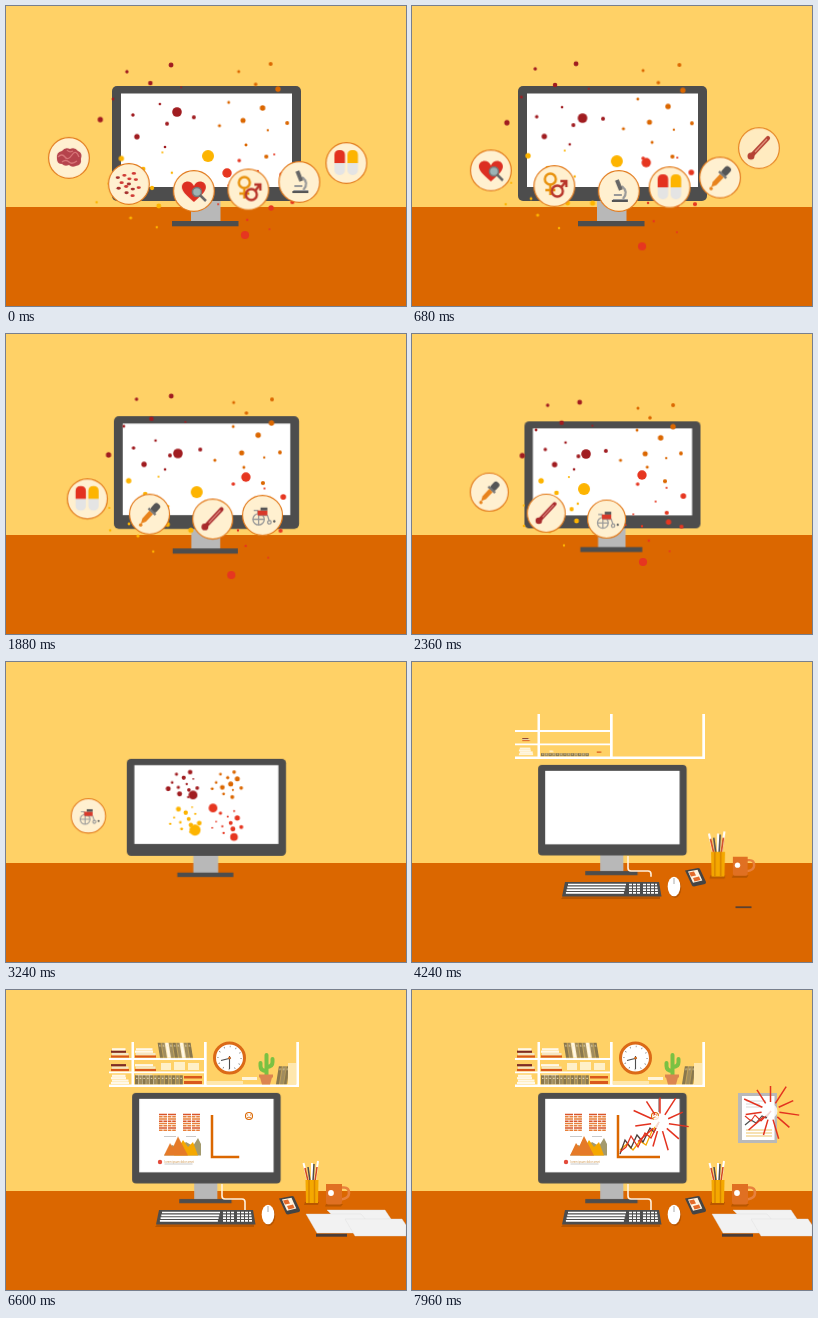
An HTML page for the animation above (8000 ms loop, 400 by 300 pixels).

```html
<!DOCTYPE html>
<html lang="en">
<head>
<meta charset="utf-8">
<title>Health desk</title>
<style>
html, body { margin: 0; width: 100%; height: 100%; overflow: hidden; background: #ffd166; }
svg { display: block; width: 100vw; height: 100vh; }
g, path, circle, rect { transform-origin: 0 0; }

.zoom { animation: zoom 8s linear infinite; transform-origin: 200px 187px; }
@keyframes zoom { 0%, 21% { transform: scale(1); } 47.5%, 100% { transform: scale(.786); } }

.dot { animation: drift 8s linear infinite; }
@keyframes drift {
  0% { transform: translate(var(--p0)); }
  18% { transform: translate(var(--p1)); }
  29.5% { transform: translate(var(--p2)); }
  40.5%, 44% { transform: translate(var(--p3)) scale(.93); }
  49%, 100% { transform: translate(var(--p3)) scale(0); }
}

/* Badges follow one arc, 400 ms apart */
.badge { animation: arc 8s linear calc((var(--k) - 25.6) * 400ms) infinite; }
@keyframes arc {
  0% { transform: translate(348px, 136px) scale(.3); opacity: 0; }
  1.5% { transform: translate(347px, 142px); opacity: .85; }
  3% { transform: translate(340.5px, 157px); opacity: 1; }
  5.5% { transform: translate(318px, 168.5px); }
  8% { transform: translate(293.5px, 176px); }
  13% { transform: translate(242.5px, 183.5px); }
  16.5% { transform: translate(207px, 185px); }
  18% { transform: translate(188px, 185px); }
  23% { transform: translate(123px, 178px); }
  26.5% { transform: translate(79px, 164.5px); }
  28% { transform: translate(63px, 152px); }
  28.6% { transform: translate(60px, 147px); opacity: 1; }
  30%, 100% { transform: translate(58px, 139px) scale(.3); opacity: 0; }
}

/* Gates keep wrapped animations out of sight */
.first { animation: first 8s step-end infinite; }
@keyframes first { 0% { visibility: visible; } 43.8%, 100% { visibility: hidden; } }
.desk { animation: desk 8s step-end infinite; }
@keyframes desk { 0% { visibility: hidden; } 43%, 100% { visibility: visible; } }
.late { animation: late 8s step-end infinite; }
@keyframes late { 0% { visibility: hidden; } 72.5%, 100% { visibility: visible; } }

.pop, .grow, .draw { animation: pop 8s calc(var(--d) * 1ms - 8s) infinite; transform-box: fill-box; transform-origin: center; }
.grow { transform-origin: bottom; animation-name: grow; }
.draw { stroke-dasharray: 1 2; animation-name: draw; }
@keyframes pop {
  0% { transform: scale(0); animation-timing-function: ease-out; }
  3.5% { transform: scale(1.08); }
  5%, 55% { transform: scale(1); }
  55.01%, 100% { transform: scale(0); }
}
@keyframes grow {
  0% { transform: scaleY(0); animation-timing-function: ease-out; }
  5%, 55% { transform: scaleY(1); }
  55.01%, 100% { transform: scaleY(0); }
}
@keyframes draw { 0% { stroke-dashoffset: 1; } 6%, 55% { stroke-dashoffset: 0; } 55.01%, 100% { stroke-dashoffset: 1; } }

.settle { animation: settle 8s ease-in-out infinite; }
@keyframes settle { 0%, 68% { transform: translate(var(--from)); } 73.5%, 100% { transform: translate(0, 0); } }

.fall { animation: fall 8s linear infinite; transform-origin: 378px 194px; }
@keyframes fall {
  0%, 61% { transform: translate(24px, -140px) rotate(25deg); opacity: 0; }
  61.1% { transform: translate(24px, -140px) rotate(25deg); opacity: 1; }
  66.5% { transform: translate(0, 0) rotate(0); opacity: 1; }
  69% { transform: translate(-24px, 36px) rotate(-40deg) scaleY(.45); opacity: 1; }
  70%, 100% { transform: translate(-26px, 38px) rotate(-50deg) scaleY(.3); opacity: 0; }
}
</style>
</head>
<body>
<svg viewBox="0 0 400 300" preserveAspectRatio="none">
  <rect width="400" height="300" fill="#ffd166"/>
  <rect y="201" width="400" height="99" fill="#db6700"/>

  <g class="desk">
    <g fill="#fff">
      <rect class="pop" style="--d:3650" x="103" y="94.5" width="190" height="2.5"/>
      <path class="grow" style="--d:3800" d="M125.5 52h2.5v43h-2.5zM198 52h2.7v43H198zM290.3 52h2.7v43h-2.7z"/>
      <path class="pop" style="--d:3800" d="M103 68h96v2h-96zM103 81.5h96v1.8h-96z"/>
    </g>
    <g id="books"></g>
    <path class="grow" style="--d:4250" fill="#ffe7ad" d="M201 91h36v3.5h-36zM282 73h8v21h-8z"/>
    <rect class="pop" style="--d:4400" x="236" y="87" width="15" height="3" fill="#fff5dc"/>
    <g class="settle" style="--from:1.5px,1px"><g class="pop" style="--d:4300">
      <circle cx="223.5" cy="68" r="15" fill="#fff" stroke="#db6a17" stroke-width="3"/>
      <circle cx="223.5" cy="68" r="11.5" fill="none" stroke="#777" stroke-width="1.6" stroke-dasharray=".7 5.32"/>
      <path d="M215 70.5 225 68M223.5 66v13" stroke="#4d4d4d" stroke-width="1.1"/>
      <circle cx="223.5" cy="68" r="1.3" fill="#db6a17"/>
    </g></g>
    <g class="grow" style="--d:4450">
      <path d="M260.5 86V65M260.5 81q-6 0-6-5v-3M260.5 77q6 0 6-5v-3" fill="none" stroke="#7ac143" stroke-linecap="round" stroke-width="4"/>
      <path d="M253 84.5h14v3h-1l-2 7h-8l-2-7h-1z" fill="#dc8550"/>
    </g>
  </g>

  <g class="zoom">
    <rect x="185" y="194" width="29.5" height="22" fill="#b8b8b8"/>
    <rect x="166" y="215" width="66.5" height="5.3" fill="#4d4d4d"/>
    <rect x="106" y="80" width="189" height="115" rx="5" fill="#4d4d4d"/>
    <rect x="115" y="87.5" width="171" height="93.5" fill="#fff"/>
  </g>

  <g id="dots"></g>

  <g class="desk">
    <path class="draw" style="--d:3950" pathLength="1" d="M216 194v12q0 3 3 3h17q3 0 3 3v8" fill="none" stroke="#fff0dc" stroke-width="1.6"/>
    <g class="pop" style="--d:3600">
      <path d="M151 234.5h97v2.5h-99z" fill="#b85600"/>
      <path d="M153 220h94l2.5 14.5H150z" fill="#4d4d4d"/>
      <g id="keys" stroke="#fff" stroke-width="1.7"></g>
    </g>
    <g class="pop" style="--d:3750" transform="rotate(-18 262 224.5)">
      <ellipse cx="263" cy="226" rx="6.3" ry="10" fill="#b85600"/>
      <ellipse cx="262" cy="224.5" rx="6.3" ry="9.8" fill="#fff"/>
      <path d="M262 216v6" stroke="#aaa"/>
    </g>
    <g class="pop" style="--d:3850">
      <path d="M273 208.5 286 206q1.5 0 2 1l6 13q0 1.5-1 2l-11 2.500q-1.500 0-2-1z" fill="#444"/>
      <path d="m276 209.500 9.500-1.800 4.800 10.800-9.300 2.200z" fill="#fff4e0"/>
      <path d="m277 210.500 5-1 2 4-5 1zM281 216l6-1.500 1.500 3.500-6 1.500z" fill="#e36a2a"/>
    </g>
    <g class="pop" style="--d:3950">
      <path d="M299 212h14l-1 3h-14z" fill="#b85600"/>
      <path d="M302 191 297.5 173M306 191V173M309 191l3-20" stroke="#fff" stroke-width="2"/>
      <path d="M304 191l-2-14M307 191l1-17" stroke="#4d4d4d" stroke-width="1.5"/>
      <path d="M309 191l2-14M299 178l3 13" stroke="#d24a20" stroke-width="1.6"/>
      <path d="M299.5 190h13l-.5 23h-12z" fill="#f5a800"/>
      <path d="M303 190v23M308.5 190v23" stroke="#d98500" stroke-width="1.5"/>
    </g>
    <g class="pop" style="--d:4050">
      <path d="M320 214h17l-2 2.5h-16z" fill="#b85600"/>
      <path d="M335 197.5h3q5 0 5 5.5t-8 6.5" fill="none" stroke="#e8813c" stroke-width="2.6"/>
      <path d="M320 194h16v18q0 2.500-2 2.500h-12q-2 0-2-2.500z" fill="#e07022"/>
      <circle cx="325" cy="203" r="2.9" fill="#fff"/>
    </g>
    <g class="settle" style="--from:6px,0px"><rect class="pop" style="--d:4150" x="310" y="243.7" width="31" height="3" fill="#4a3d38"/></g>
    <g fill="#f2f2f2" stroke="#dcdcdc" stroke-width=".4">
      <path class="pop" style="--d:5500" d="M321 220h58l6 9-52 3z"/>
      <path class="pop" style="--d:5560" d="M300 224h55l16 19h-60z"/>
      <path class="pop" style="--d:4750" d="M339 229h57l4 6v11h-51z"/>
      <path class="fall" fill-opacity=".85" stroke="none" d="M372 161 388 172Q382 200 383 227 374 222 367 212 371 195 372 161z"/>
    </g>

    <g class="pop" style="--d:4500">
      <circle cx="243" cy="126" r="3.5" fill="none" stroke="#db6700" stroke-width="1.1"/>
      <path d="M241 125h1.2M244 125h1.2M241 128q2-2 4 0" fill="none" stroke="#db6700" stroke-width=".9"/>
    </g>
    <g class="settle" style="--from:0px,5px"><g class="pop" style="--d:4700">
      <circle cx="154" cy="172" r="2.2" fill="#e34a3a"/>
      <text x="158.5" y="172.500" font-family="Open Sans, sans-serif" font-size="2.600" fill="#c98a3a">lorem ipsum dolor amet</text>
    </g></g>
  </g>

  <g class="late">
    <g id="tables" stroke-width="1.700"></g>
    <path class="pop" style="--d:6100" d="M158 146.500h12M180 146.500h10M158.500 174h28" stroke="#bbb" stroke-width=".8"/>
    <path class="grow" style="--d:6150" fill="#a39a6d" d="M158 165.500 166 155 173 158 180 152 187 156 192 148 195 154v11.500z"/>
    <path class="grow" style="--d:6200" fill="#f5a800" d="M168 165.500 177 150 182 157 187 152 192 165.500z"/>
    <path class="grow" style="--d:6250" fill="#e57a28" d="M158 165.500 164 153 167 157 172 146 182 165.500z"/>
    <path class="draw" style="--d:6350" pathLength="1" d="M206 125v42h42" fill="none" stroke="#db6700" stroke-width="2.500"/>
    <g fill="none" stroke-width="1.300">
      <path class="draw" style="--d:6700" pathLength="1" d="M208 160l7-6 6 6 7-9 6 4 6-14 7-9" stroke="#f5a800"/>
      <path class="draw" style="--d:6800" pathLength="1" d="M208 164l5-14 6 8 6-13 6 7 7-14 4 4 5-10" stroke="#4d3d38"/>
      <path class="draw" style="--d:6900" pathLength="1" d="M208 162l6-5 5-11 7 11 7-14 6 5 8-16" stroke="#e3321f"/>
    </g>
    <path class="draw" style="--d:7200" pathLength="1" d="M247 122V109" stroke="#6a4540"/>

    <g class="pop" style="--d:6800">
      <path d="M326 103h39v50h-39z" fill="#b9b9b9"/>
      <path d="M330 106h32.500v44H330z" fill="#fff"/>
      <path d="M334 111h20M334 114h14M334 117h17" stroke="#ccc" stroke-width=".8"/>
      <path d="M334 140h26M334 143h26M334 146h26" stroke="#f4d79a" stroke-width="1.500"/>
      <g fill="none" stroke-width="1.100">
        <path d="M333 135l6-5 5 3 6-7 4 2 5-7" stroke="#4d4d4d"/>
        <path d="M333 126l6 5 4-6 6 6 10-10" stroke="#e3321f"/>
      </g>
    </g>
    <g id="bursts"></g>
  </g>

  <g class="first"><g class="zoom" id="badges"></g></g>
</svg>
<script>
const svg = document.querySelector('svg');
const add = (parent, markup) => svg.querySelector(parent).insertAdjacentHTML('beforeend', markup);
const mix = (a, b, f) => a.map((v, i) => v + (b[i] - v) * f);
let seed = 7;
const random = () => (seed = seed * 16807 % 2147483647) / 2147483647;

function dot(color, r, stops) {
  const vars = stops.map(([x, y], i) => `--p${i}:${x}px,${y}px`).join(';');
  add('#dots', `<circle class="dot" r="${r}" fill="${color}" style="${vars}"/>`);
}

// A wide cloud that wanders, then gathers into a small one on the screen
function swarm(color, wide, spread, home) {
  const count = 12;
  for (let i = 0; i < count; i++) {
    const a = i * 2.4, d = Math.sqrt((i + .5) / count);
    const at = ([x, y], [rx, ry]) => [x + rx * d * Math.cos(a), y + ry * d * Math.sin(a)];
    const start = at(wide, spread), end = at(home, [18, 14]);
    const wander = [start[0] + 16 * random() - 8, start[1] + 16 * random() - 8];
    dot(color, 1 + 1.9 * random() ** 1.5, [start, wander, mix(wander, end, .22), end]);
  }
}
const [crimson, orange, yellow, red] = ['#a01c20', '#db6700', '#fdb400', '#e63620'];
swarm(crimson, [142, 98], [58, 46], [177, 122]);
swarm(orange, [248, 102], [42, 52], [221, 122]);
swarm(yellow, [135, 182], [54, 42], [179, 157]);
swarm(red, [250, 184], [46, 42], [221, 161]);
dot(crimson, 4.8, [[171, 106], [170, 119], [174, 120], [187, 133]]);
dot(yellow, 6, [[202, 150], [208, 161], [172, 155], [189, 168]]);
dot(red, 4.7, [[221, 167], [249, 145], [230, 141], [207, 146]]);
dot(red, 4.1, [[239, 229], [220, 253], [231, 228], [228, 175]]);

const icons = [
  // tissue
  `<path d="M-12 1q-1-7 5-8 3-4 8-2 5-2 8 2 5 2 3 8 1 6-5 7-4 2-7-1-4 2-7-1-5 0-5-5z" fill="#b5434c"/>
   <path d="M-11-1q4-4 7 0t7-2 7 2M-7 4q4-3 7 0t8-1M-2-8q2 3 6 1" fill="none" stroke="#d9777a" stroke-width="1.3"/>`,
  // cells
  [...Array(13)].map((_, i) => {
    const a = i * 2.4, d = 3.7 * Math.sqrt(i);
    return `<ellipse cx="${d * Math.cos(a)}" cy="${d * Math.sin(a)}" rx="2.1" ry="1.4" fill="${i % 3 ? '#cf3a35' : '#a5302f'}"/>`;
  }).join(''),
  // heart
  `<path d="M0 11C-8 4-12 0-12-4c0-6 9-8 12-1 3-7 12-5 12 1 0 4-4 8-12 15z" fill="#dc2f22"/>
   <circle cx="3" cy="1" r="4.500" fill="#9db3b5" stroke="#777" stroke-width="1.500"/><path d="m6 4 6 6" stroke="#666" stroke-width="2.500"/>`,
  // genders
  `<g fill="none" stroke-width="2.400"><g stroke="#e8910c"><circle cx="-4" cy="-7" r="5.500"/><path d="M-4-1V9M-9 4H1"/></g>
   <g stroke="#b8352a"><circle cx="3" cy="5" r="5.500"/><path d="m7 1 4-5M6-5h6v6"/></g></g>`,
  // microscope
  `<g fill="none" stroke="#999" stroke-width="2.200"><path d="M3-5q7 6 1 13M-6 9H9M-5 4h8"/><path d="m-2-11 4 10" stroke="#666" stroke-width="4"/></g>
   <path d="M-7 9H9v2H-7z" fill="#555"/>`,
  // capsules
  [['#e3321f', -12], ['#fdb400', 1]].map(([c, x]) =>
    `<rect x="${x}" y="-13" width="10.500" height="25" rx="5" fill="#e4e4e4"/><path d="M${x} 0v-8q0-5 5.250-5t5.250 5v8z" fill="${c}"/>`).join(''),
  // dropper
  `<g transform="rotate(43)"><rect x="-3.500" y="-14" width="7" height="10" rx="3" fill="#555"/><path d="M-5-5H5v2.500H-5z" fill="#777"/>
   <path d="M-2.500-2.500h5V8L0 13-2.500 8z" fill="#e8831c"/></g><circle cx="-9" cy="11" r="1.800" fill="#e8831c"/>`,
  // thermometer
  `<path d="M9-10-7 7" stroke="#a82a2c" stroke-width="4.200" stroke-linecap="round"/><path d="M8-9-4 4" stroke="#dd8a80" stroke-width="1.200"/>
   <circle cx="-8" cy="8" r="3.500" fill="#a82a2c"/>`,
  // wheelchair
  `<g fill="none" stroke="#999" stroke-width="1.300"><circle cx="-4" cy="4" r="5.800"/><circle cx="7" cy="7" r="1.800"/><path d="M-9-5h4l1 5H5l2 6M-4-2v12M-10 4H2"/></g>
   <path d="M-5-5H5v5H-5z" fill="#d9392a"/><path d="M-2-8h7v3h-7z" fill="#555"/><circle cx="12" cy="6" r="1.200" fill="#555"/>`
];
icons.forEach((icon, k) => add('#badges', `<g class="badge" style="--k:${k}">
  <circle r="20.400" fill="#fff0d0" stroke="#e27a1c" stroke-width="1.200"/>${icon}</g>`));

const inks = ['#7d2b25', '#f4e6c4', '#d9581c', '#8f7d55'];
const paper = '#fff8e8';

// Lying books: one pile per shelf in each of two bays
[[105, 18], [129, 21]].forEach(([x, width], bay) => [67.8, 81.3, 94.3].forEach((y, shelf) => {
  let pile = '';
  for (let j = 0; j < 4 - shelf % 2; j++) {
    const fill = j > 1 + (1 - bay) || shelf === 2 ? paper : inks[(j * 3 + 2) % 4];
    pile += `<rect x="${x + j % 2}" y="${y - 2.4 * (j + 1)}" width="${width - j * 1.5}" height="2.200" fill="${fill}"/>`;
  }
  add('#books', `<g class="pop" style="--d:${4250 - shelf * 80 + bay * 120}">${pile}</g>`);
}));

function uprights(x, y, count, height, slant, delay) {
  let row = '';
  for (let j = 0; j < count; j++) {
    const left = j * 3.7;
    row += `<rect x="${left}" y="${-height}" width="3.400" height="${height}" fill="${j % 4 === 2 && slant > 0 ? paper : j % 2 ? '#a08c5e' : '#89774d'}"/>
      <path d="M${left + 1} ${3 - height}h1.500" stroke="#f4e6c4"/>`;
  }
  add('#books', `<g class="grow" style="--d:${delay}"><g transform="translate(${x} ${y}) skewX(${slant})">${row}</g></g>`);
}
uprights(154, 67.800, 9, 15, 9, 4300);
uprights(129, 94.300, 13, 9, 0, 4150);
uprights(270, 94.300, 3, 18, -9, 4400);
add('#books', '<path class="pop" style="--d:4350" d="M155 73h10v7h-10zM168 72h11v8h-11zM182 73h11v7h-11z" fill="#fff0c8"/>');
add('#books', '<path class="pop" style="--d:4200" d="M178 86h18v2.500h-18zM178 91h18v3h-18z" fill="#d9581c"/>');

for (let i = 0; i < 4; i++) {
  const y = 222.5 + i * 2.8;
  add('#keys', `<path d="M${156 - i * .7} ${y}h58"/><path d="M217 ${y}h11M231 ${y}h${14 + i * .4}" stroke-dasharray="3 1"/>`);
}

[153, 177].forEach((x, i) => {
  let rows = '';
  for (let j = 0; j < 8; j++)
    rows += `<path d="M${x} ${124.5 + j * 2.25}h17" stroke="${j % 3 ? '#e8803a' : '#d9552a'}" stroke-dasharray="${j % 2 ? '3.600 .8' : '8 1'}"/>`;
  add('#tables', `<g class="pop" style="--d:${5920 + i * 120}">${rows}</g>`);
});

function burst(x, y, delay) {
  let rays = `<circle class="pop" cx="${x}" cy="${y}" r="7" fill="#fff" fill-opacity=".8"/>`;
  for (let i = 0; i < 11; i++) {
    const a = (i / 11 - .25) * 2 * Math.PI, c = Math.cos(a), s = Math.sin(a), r = i % 2 ? 29 : 25;
    rays += `<path class="draw" pathLength="1" d="M${x + 9 * c} ${y + 9 * s}L${x + r * c} ${y + r * s}" stroke="#e3321f" stroke-width="1.500"/>`;
  }
  add('#bursts', `<g style="--d:${delay}">${rays}</g>`);
}
burst(248, 132.5, 7250);
burst(358.5, 121, 7400);
</script>
</body>
</html>
```
